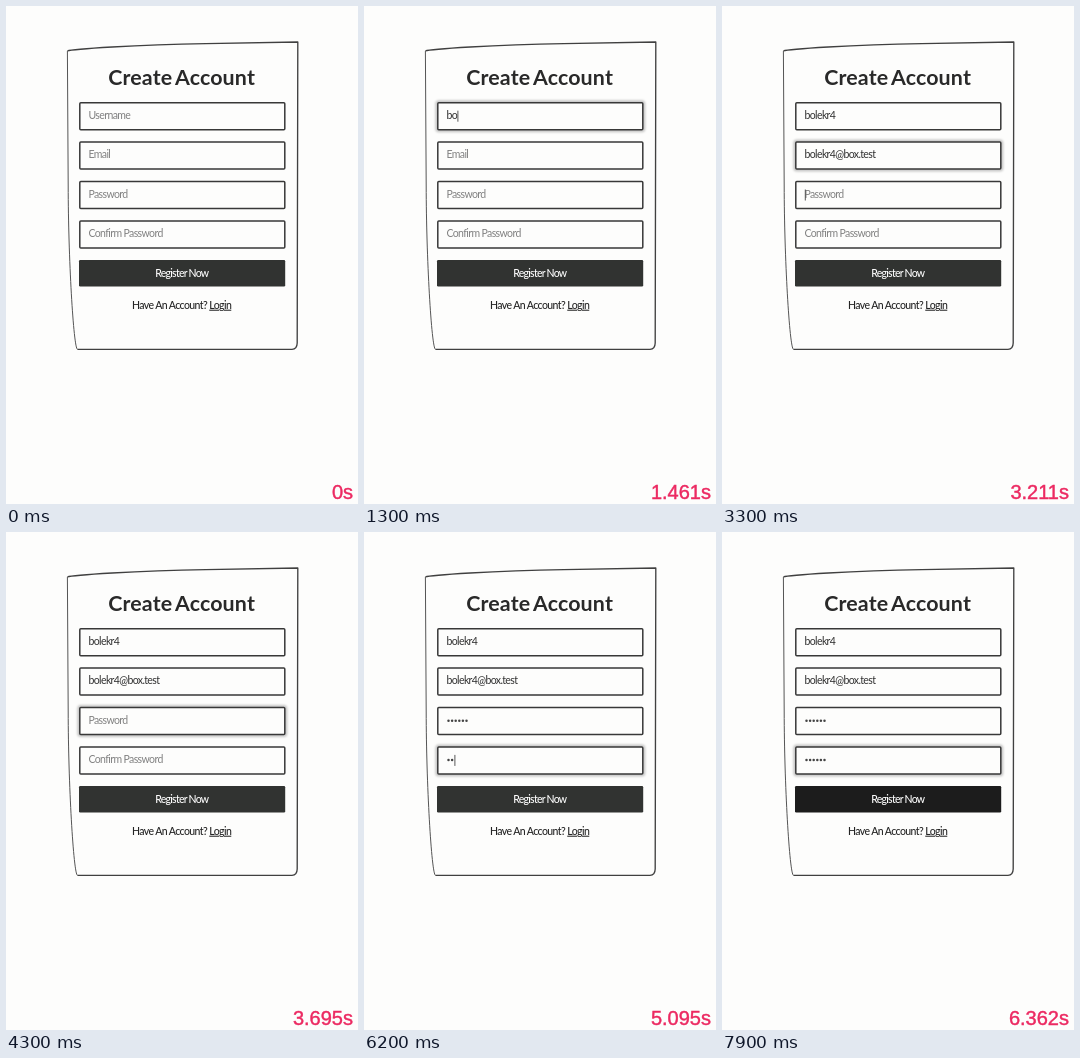
Write an HTML page that moves like this. It is 352x498 px and loops after 8000 ms.

```html
<!DOCTYPE html>
<html lang="en">
<head>
<meta charset="utf-8">
<title>Create account form</title>
<style>
  html, body { margin: 0; width: 100%; height: 100%; overflow: hidden; background: #fdfdfc; }
  svg { display: block; width: 352px; height: 498px; }
  text { font: 10.5px Lato, sans-serif; letter-spacing: -0.62px; fill: #303030; }
  .title { font-size: 21.4px; font-weight: 700; letter-spacing: .15px; word-spacing: -2px; fill: #292929; }
  .hint { fill: #808080; }
  .button { fill: #fff; font-weight: 500; letter-spacing: -0.75px; }
  .foot { fill: #252525; font-weight: 500; letter-spacing: -0.58px; }
  .timer { font: 20px "Liberation Sans", Arial, sans-serif; letter-spacing: 0; fill: #ec2a62; stroke: #ec2a62; stroke-width: .45; }
  .card { fill: none; stroke: #404040; stroke-width: 1.35; stroke-linejoin: round; }
  .card.thin { stroke: #555; stroke-width: 1; }
  .box { fill: #fdfdfc; stroke: #383838; stroke-width: 1.5; }
  .glow { fill: none; stroke: #000; stroke-opacity: .22; stroke-width: 5; }
  .caret { stroke: #444; stroke-width: .9; }
</style>
</head>
<body>
<svg viewBox="0 0 352 498">
  <defs>
    <filter id="soft" filterUnits="userSpaceOnUse" x="60" y="-12" width="234" height="54">
      <feGaussianBlur stdDeviation="0.8"/>
    </filter>
  </defs>
  <path class="card" d="M61.4 45 C66 43 130 38.8 200 37.6 L291.8 36 L291.2 337 Q291 343.3 286 343.3 L71.5 343.4"/>
  <path class="card thin" d="M71.5 343.4 C67.5 343 62.2 250 62.2 180 L61.4 45"/>
  <text class="title" x="175.6" y="79.3" text-anchor="middle">Create Account</text>
  <g id="fields"></g>
  <rect id="button" x="73" y="254" width="206.2" height="26.5" rx="1.2"/>
  <text class="button" x="175.8" y="270.7" text-anchor="middle">Register Now</text>
  <text class="foot" x="175.6" y="302.7" text-anchor="middle">Have An Account? <tspan text-decoration="underline">Login</tspan></text>
  <text id="timer" class="timer" x="347" y="493" text-anchor="end">0s</text>
</svg>
<script>
const LOOP = 8000, STEP = 100;
const BLINK = 13;        // caret period, in steps
const PITCH = 39.4;      // distance between fields
const TICK = 0.01667, TICK_START = 0.0108;

// All times are in steps of 100 ms.
const FIELDS = [
  { hint: 'Username', value: 'bolekr4', focus: 7, blur: 22, glow: [8, 22], first: 11, pace: 1.4 },
  { hint: 'Email', value: 'bolekr4@box.test', focus: 22, blur: 33, glow: [24, 33], first: 24, pace: 0.5 },
  { hint: 'Password', dots: 6, focus: 33, blur: 56, glow: [34, 56], first: 45, pace: 1.7 },
  { hint: 'Confirm Password', dots: 6, focus: 56, blur: 81, glow: [57, 81], first: 59.5, pace: 1.9 }
];
// [step, clock ticks]
const CLOCK = [[0, 0], [13, 87], [23, 137], [33, 192], [43, 221], [62, 305], [79, 381]];
const BUTTON_HOVER = 76;

function add(parent, name, attrs) {
  const el = document.createElementNS('http://www.w3.org/2000/svg', name);
  for (const key in attrs) el.setAttribute(key, attrs[key]);
  return parent.appendChild(el);
}

const show = (el, on) => { el.style.display = on ? '' : 'none'; };

function build(field, row) {
  const g = add(document.getElementById('fields'), 'g',
    { transform: `translate(0 ${(96.7 + row * PITCH).toFixed(1)})` });
  const frame = { x: 73.8, y: 0, width: 205, height: 27, rx: 1 };
  field.glowEl = add(g, 'rect', { ...frame, class: 'glow', filter: 'url(#soft)' });
  add(g, 'rect', { ...frame, class: 'box' });
  field.text = add(g, 'text', { x: 82.5, y: 16.2 });
  field.bullets = Array.from({ length: field.dots || 0 }, (_, i) =>
    add(g, 'circle', { cx: 84.5 + i * 3.6, cy: 13.2, r: 1.25, fill: '#444' }));
  field.caret = add(g, 'path', { d: 'M0 8V19', class: 'caret' });
}

function drawField(f, step) {
  const total = f.dots || f.value.length;
  const typed = Math.floor((step - f.first) / f.pace + 1e-6) + 1;
  const count = Math.max(0, Math.min(total, typed));

  f.text.textContent = count === 0 ? f.hint : f.dots ? '' : f.value.slice(0, count);
  f.text.setAttribute('class', count ? 'value' : 'hint');
  f.bullets.forEach((dot, i) => show(dot, i < count));
  show(f.glowEl, step >= f.glow[0] && step <= f.glow[1]);

  const lastKey = count ? f.first + (count - 1) * f.pace : f.focus;
  const lit = (step - lastKey) % BLINK < BLINK / 2;
  show(f.caret, step >= f.focus && step < f.blur && lit);
  const width = !count ? 0 : f.dots ? count * 3.6 + 0.4 : f.text.getComputedTextLength();
  f.caret.setAttribute('transform', `translate(${83.3 + width} 0)`);
}

function clockText(step) {
  if (step === 0) return '0s';
  let i = 1;
  while (i < CLOCK.length - 1 && step > CLOCK[i][0]) i++;
  const [s0, n0] = CLOCK[i - 1], [s1, n1] = CLOCK[i];
  const ticks = Math.round(n0 + (n1 - n0) * (step - s0) / (s1 - s0));
  return (TICK_START + ticks * TICK).toFixed(3) + 's';
}

const button = document.getElementById('button');
const timer = document.getElementById('timer');

function draw(step) {
  FIELDS.forEach(f => drawField(f, step));
  button.setAttribute('fill', step >= BUTTON_HOVER ? '#1c1c1c' : '#313331');
  timer.textContent = clockText(step);
}

FIELDS.forEach(build);
const start = performance.now();
let shown = -1;

function tick() {
  const step = Math.floor(((performance.now() - start) % LOOP) / STEP);
  if (step !== shown) draw(shown = step);
  requestAnimationFrame(tick);
}
tick();
</script>
</body>
</html>
```
